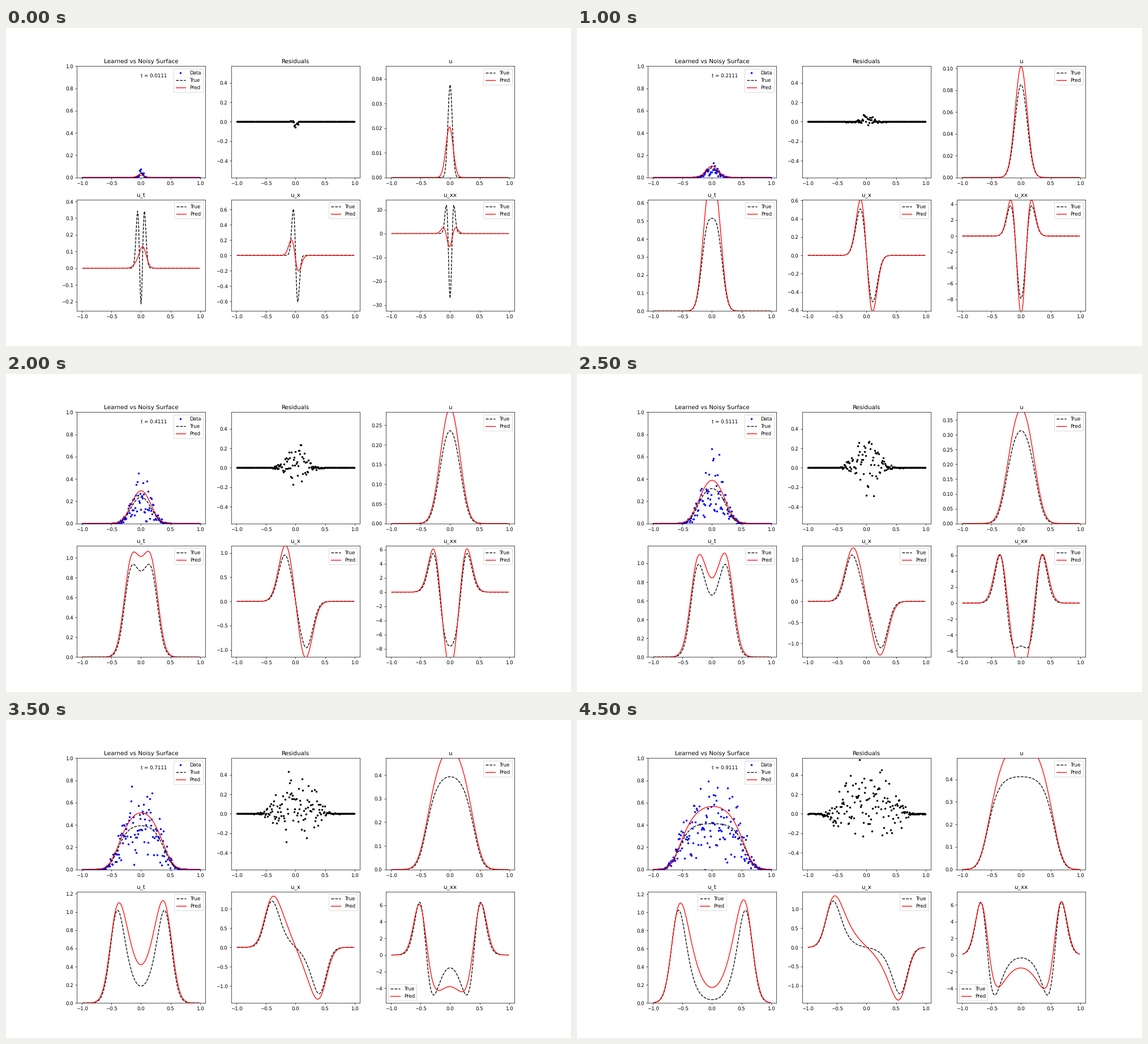
A matplotlib script that plays this animation: 998 by 561 pixels, repeating every 5000 ms.

```python
import numpy as np
import matplotlib.pyplot as plt
from matplotlib.animation import FuncAnimation

plt.rcParams["text.hinting"] = "none"

DPI = 62.5
FRAMES, INTERVAL = 10, 500
DIFF, GROWTH, CAP = 0.0205, 10.0, 0.416      # reaction-diffusion constants
H, DT, STEPS = 0.005, 1e-4, 1000
NOISE = 0.44

times = 1 / 90 + 0.1 * np.arange(FRAMES)
grid = np.linspace(-1, 1, 401)
inner = slice(2, -2, 2)
x = grid[inner]


def laplacian(u):
    p = np.pad(u, 1, mode="reflect")
    return (p[2:] - 2 * u + p[:-2]) / H**2


def rate(u):
    return DIFF * laplacian(u) + GROWTH * u * (1 - u / CAP)


def solve_true():
    """Integrate the growing, spreading bump and keep one state per frame."""
    u = 0.0376 * np.exp(-grid**2 / (2 * 0.00138))
    states = []
    for _ in range(FRAMES):
        fields = u, rate(u), np.gradient(u, H), laplacian(u)
        states.append([f[inner] for f in fields])
        for _ in range(STEPS):
            u = u + DT * rate(u)
    return states


# Learned surface: height (as a logit), spread, saturation and centre per frame
params = np.array([
    [-3.34, -2.52, -1.589, -0.75, -0.04, 0.60, 1.19, 1.735, 2.29, 2.84],
    [.0037, .0064, .0096, .0140, .0187, .0233, .0276, .0315, .0354, .0393],
    [0, .03, .07, .18, .32, .50, .65, .765, .84, .894],
    [-.01, 0, 0, 0, 0, 0, 0, 0, 0, 0],
])
speeds = np.gradient(params, 0.1, axis=1, edge_order=2)
speeds[:, 0] = 5.5, 0.011, 0.2, 0.17
speeds[3, 1:] = 0


def bump(p):
    height, spread, sat, centre = p
    d = grid - centre
    base = sat + (1 - sat) * np.exp(d**2 / (4 * spread))
    return 0.6 / (1 + np.exp(-height)) * (1 + 0.03 * grid) / base**2


def learned(i):
    p, v, eps = params[:, i], speeds[:, i], 1e-4
    u = bump(p)
    u_t = (bump(p + eps * v) - bump(p - eps * v)) / (2 * eps)
    fields = u, u_t, np.gradient(u, H), laplacian(u)
    return [f[inner] for f in fields]


true = solve_true()
pred = [learned(i) for i in range(FRAMES)]


def noisy(i):
    rng = np.random.default_rng(40 + i)
    u = true[i][0]
    return np.maximum(u * (1 + NOISE * rng.standard_normal(x.size)), 0)


data = [noisy(i) for i in range(FRAMES)]

fig, axes = plt.subplots(2, 3, figsize=(15.968, 8.976), dpi=DPI)
surface, resid, *panels = axes.flat
titles = ["Learned vs Noisy Surface", "Residuals", "u", "u_t", "u_x", "u_xx"]
for ax, title in zip(axes.flat, titles):
    ax.set_title(title)
    ax.set_xlim(-1.09, 1.09)


def add_pair(ax):
    black, = ax.plot([], [], "k--", label="True")
    red, = ax.plot([], [], "r", label="Pred")
    return black, red


dots, = surface.plot([], [], "b.", label="Data")
surface_pair = add_pair(surface)
surface.set_ylim(0, 1)
surface.legend(loc="upper right")
clock = surface.text(0, 0.9, "")

res_dots, = resid.plot([], [], "k.")
resid.set_ylim(-0.57, 0.57)

pairs = [add_pair(ax) for ax in panels]
legends = [ax.legend(loc="upper right") for ax in panels]


def set_pair(pair, a, b):
    pair[0].set_data(x, a)
    pair[1].set_data(x, b)


def update(i):
    dots.set_data(x, data[i])
    set_pair(surface_pair, true[i][0], pred[i][0])
    clock.set_text(f"t = {times[i]:.4f}")
    res_dots.set_data(x, pred[i][0] - data[i])
    for ax, pair, a, b in zip(panels, pairs, true[i], pred[i]):
        set_pair(pair, a, b)
        ax.set_ylim(min(1.2 * a.min(), 0), 1.2 * a.max())
    # legends step aside when the curves reach them
    legends[1].set_loc("upper center" if times[i] > 0.9 else "upper right")
    legends[3].set_loc("lower left" if times[i] > 0.7 else "upper right")
    return []


anim = FuncAnimation(fig, update, frames=FRAMES, interval=INTERVAL,
                     init_func=lambda: update(0), repeat=True, repeat_delay=0)
plt.show()
```
